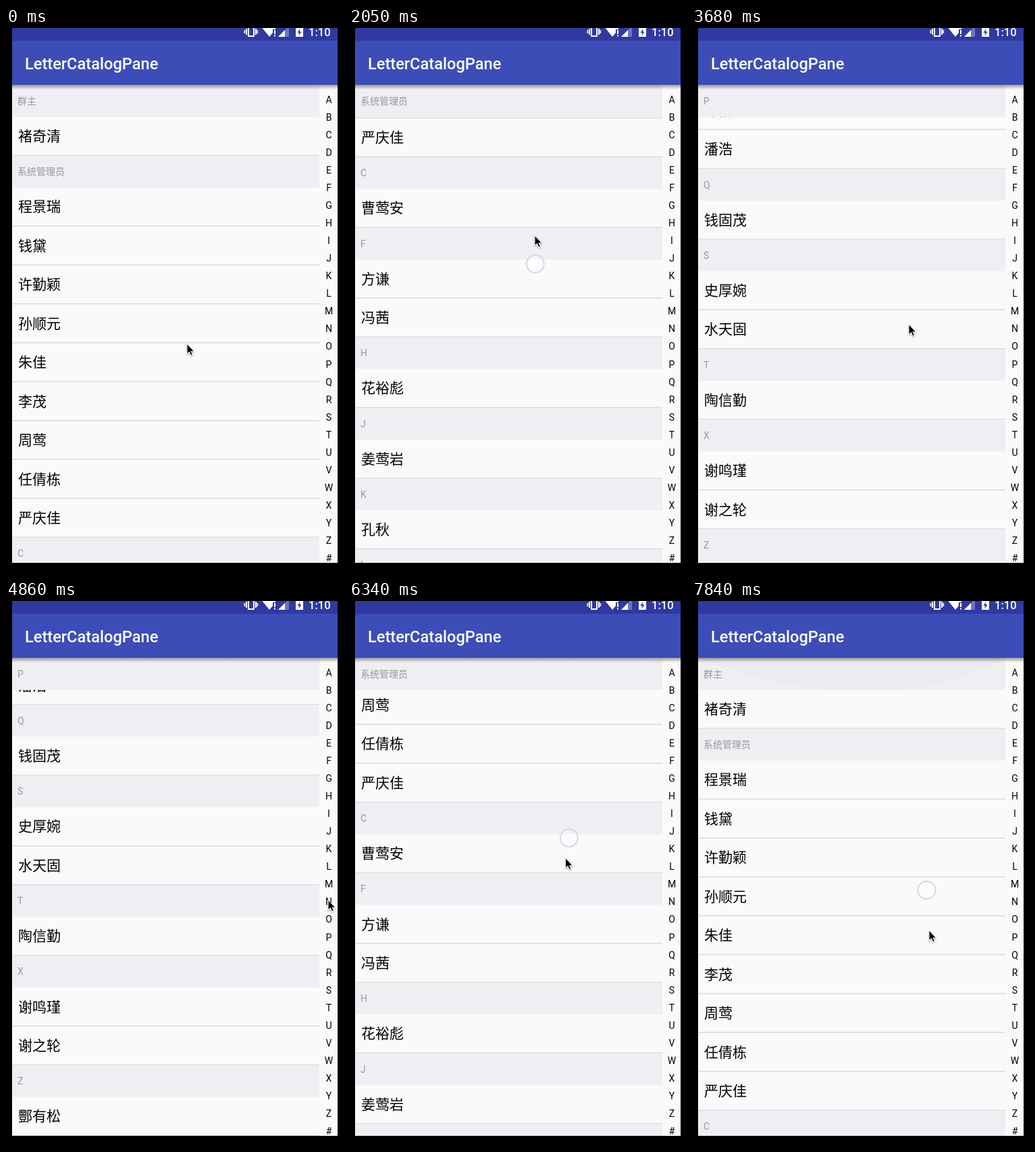
Write an HTML page with a canvas that moves like this. It is 499 by 805 pixels and loops after 7.99 s.

```html
<!DOCTYPE html>
<html lang="zh-CN">
<head>
<meta charset="utf-8">
<title>Indexed list</title>
<style>
  html, body { margin: 0; width: 100%; height: 100%; overflow: hidden; background: #000; }
  canvas { display: block; }
</style>
</head>
<body>
<canvas id="stage" width="499" height="805"></canvas>
<script>
const ctx = document.getElementById('stage').getContext('2d');
const LOOP = 7990, STEP = 147.3, LAST_STEP = 53;
const LEFT = 9, LIST_RIGHT = 464, RIGHT = 491, TOP = 84.3, BOTTOM = 790;
const HEADER = 46.9, ROW = 57.45, INDEX_TOP = 93, INDEX_ROW = 26.06;
const LETTERS = 'ABCDEFGHIJKLMNOPQRSTUVWXYZ#';
const SANS = 'Roboto, "Noto Sans CJK SC", "Noto Sans CJK", sans-serif';

const sections = [
  ['群主', '褚奇清'],
  ['系统管理员', '程景瑞 钱黛 许勤颖 孙顺元 朱佳 李茂 周莺 任倩栋 严庆佳'],
  ['C', '曹莺安'], ['F', '方谦 冯茜'], ['H', '花裕彪'], ['J', '姜莺岩'], ['K', '孔秋'],
  ['L', '柳莎婷 吕言栋'], ['P', '彭怡1 潘浩'], ['Q', '钱固茂'], ['S', '史厚婉 水天固'],
  ['T', '陶信勤'], ['X', '谢鸣瑾 谢之轮'], ['Z', '酆有松']
].map(([title, names]) => ({ title, names: names.split(' ') }));
let listHeight = 0;
for (const section of sections) {
  section.y = listHeight;
  listHeight += HEADER + section.names.length * ROW;
}
const sectionY = title => sections.find(s => s.title === title).y;
const maxScroll = listHeight - (BOTTOM - TOP);

// The pointer alternates between moving freely and dragging.
const pointerPath = [
  { step: 0, x: 268.5, y: 467 },
  { step: 4, x: 275, y: 790, drag: true },
  { step: 8, x: 275, y: 470 },
  { step: 11, x: 277, y: 556, drag: true },
  { step: 15, x: 275, y: 224 },
  { step: 18, x: 257, y: 613, drag: true },
  { step: 22, x: 263, y: 437 },
  { step: 33, x: 477.5, y: 442, drag: true },
  { step: 36, x: 466, y: 280, drag: true },
  { step: 38, x: 458.5, y: 239 },
  { step: 41, x: 340, y: 260, drag: true },
  { step: 45, x: 302, y: 500 },
  { step: 47, x: 284.5, y: 529 },
  { step: 51, x: 335, y: 247, drag: true },
  { step: 53, x: 351.5, y: 487 }
];
const scrollPath = [
  { step: 4, y: 0 }, { step: 11, y: 313 }, { step: 14, y: 562 }, { step: 21, y: 1374.7 },
  { step: 28, y: maxScroll }, { step: 33, y: maxScroll },
  { step: 38, y: sectionY('H') }, { step: 47, y: 71.6 }, { step: 50, y: 0 }
];

function along(path, step) {
  const i = path.findLastIndex(point => point.step < step);
  const a = path[Math.max(i, 0)], b = path[i + 1] ?? a;
  const p = a === b ? 0 : (step - a.step) / (b.step - a.step);
  const mix = key => a[key] + (b[key] - a[key]) * p;
  return { x: mix('x'), y: mix('y'), drag: i >= 0 && a.drag };
}

function scrollAt(step) {
  if (step <= 33 || step > 38) return along(scrollPath, step).y;
  // Dragging on the index jumps to a section, slightly behind the pointer.
  const row = Math.floor((along(pointerPath, step - 2).y - INDEX_TOP) / INDEX_ROW);
  return sections.findLast(s => s.title <= LETTERS[row]).y;
}

function rect(color, x, y, w, h) {
  ctx.fillStyle = color;
  ctx.fillRect(x, y, w, h);
}

function text(string, x, baseline, size, color, weight = 400, align = 'left') {
  ctx.font = `${weight} ${size}px ${SANS}`;
  ctx.textAlign = align;
  ctx.fillStyle = color;
  ctx.fillText(string, x, baseline);
}

function polygon(color, ...points) {
  ctx.beginPath();
  for (let i = 0; i < points.length; i += 2) ctx.lineTo(points[i], points[i + 1]);
  ctx.closePath();
  ctx.fillStyle = color;
  ctx.fill();
}

function header(title, y) {
  rect('#eeeef3', LEFT, y, LIST_RIGHT - LEFT, HEADER);
  text(title, 17, y + 28.6, 14, '#999');
}

function drawList(scroll) {
  rect('#fafafa', LEFT, 84, RIGHT - LEFT, BOTTOM - 84);
  for (const { title, names, y } of sections) {
    const top = TOP + y - scroll;
    header(title, top);
    names.forEach((name, i) => {
      const rowTop = top + HEADER + i * ROW;
      text(name, 18, Math.round(rowTop + 35.8), 21, '#000');
      rect('#dadadc', LEFT, rowTop + ROW - 1.2, LIST_RIGHT - LEFT, 1.5);
    });
  }
  const current = sections.findLastIndex(s => s.y <= scroll + 0.2);
  const next = sections[current + 1];
  const push = next ? Math.min(0, next.y - scroll - HEADER) : 0;
  header(sections[current].title, TOP + push);
}

function drawIndex() {
  [...LETTERS].forEach((letter, i) =>
    text(letter, 478, INDEX_TOP + 17.6 + i * INDEX_ROW, 14, '#000', 400, 'center'));
}

function drawGlow() {
  ctx.beginPath();
  ctx.moveTo(LEFT, TOP);
  ctx.quadraticCurveTo(275, 186, LIST_RIGHT, TOP);
  ctx.fillStyle = 'rgba(63, 81, 181, .012)';
  ctx.fill();
}

function drawBars() {
  const shadow = ctx.createLinearGradient(0, 84, 0, 91);
  shadow.addColorStop(0, 'rgba(0,0,0,.36)');
  shadow.addColorStop(1, 'rgba(0,0,0,0)');
  rect(shadow, LEFT, 84, RIGHT - LEFT, 7);
  rect('#3c4db7', LEFT, 19, RIGHT - LEFT, 65);
  rect('#3039a0', LEFT, 0, RIGHT - LEFT, 19);
  text('LetterCatalogPane', 28, 61, 23.6, '#fff', 500);
  text('1:10', 448, 11.5, 16.5, '#fff', 500);

  // Vibrate
  ctx.strokeStyle = '#fff';
  ctx.lineWidth = 2;
  ctx.strokeRect(359, -3, 8, 15);
  for (const side of [-1, 1]) {
    rect('#fff', 362 + side * 7, 1, 2, 9);
    rect('#fff', 362 + side * 9.5, 3, 1.6, 5);
  }
  // Wi-Fi
  polygon('#fff', 379.5, 0, 400, 0, 398, 2, 395, 2, 395, 7, 390, 13);
  rect('#fff', 397, 3, 2, 6);
  rect('#fff', 397, 10.5, 2, 2);
  // Signal
  polygon('rgba(255,255,255,.3)', 403, 13, 419, 13, 419, -3);
  polygon('#fff', 403, 13, 413, 13, 413, 3);
  // Battery
  rect('#fff', 429, 0, 11, 13);
  polygon('#3039a0', 435.5, 1, 431.5, 7, 434, 7, 433.5, 11.5, 437.5, 5.5, 435, 5.5);
}

function drawTouch({ x, y }) {
  ctx.beginPath();
  ctx.arc(x, y, 13, 0, Math.PI * 2);
  ctx.fillStyle = 'rgba(255,255,255,.35)';
  ctx.fill();
  ctx.strokeStyle = '#d6d6ec';
  ctx.lineWidth = 2;
  ctx.stroke();
}

function drawCursor({ x, y }) {
  ctx.save();
  ctx.translate(x, y);
  ctx.scale(0.93, 0.93);
  ctx.shadowColor = 'rgba(0,0,0,.4)';
  ctx.shadowBlur = 2;
  ctx.shadowOffsetY = 1;
  polygon('#fff', -1, -2, -1, 17, 3, 13.6, 5.6, 19, 9, 17.6, 6.8, 12.2, 12, 12.2);
  ctx.shadowColor = 'transparent';
  polygon('#000', 0, 0.5, 0, 14.6, 3.3, 11.5, 6, 17.3, 7.8, 16.5, 5.2, 11, 9.8, 11);
  ctx.restore();
}

function draw(now) {
  const step = Math.min(LAST_STEP, Math.floor((now % LOOP) / STEP + 0.1));
  const pointer = along(pointerPath, step);
  rect('#000', 0, 0, 499, 805);
  ctx.save();
  ctx.beginPath();
  ctx.rect(LEFT, 0, RIGHT - LEFT, BOTTOM);
  ctx.clip();
  drawList(scrollAt(step));
  drawIndex();
  if (step > 51) drawGlow();
  drawBars();
  // The touch ring trails the pointer by half a step.
  if (pointer.drag) drawTouch(along(pointerPath, step - 0.5));
  ctx.restore();
  drawCursor(pointer);
  requestAnimationFrame(() => draw(performance.now() - start));
}

const start = performance.now();
draw(0);
</script>
</body>
</html>
```
